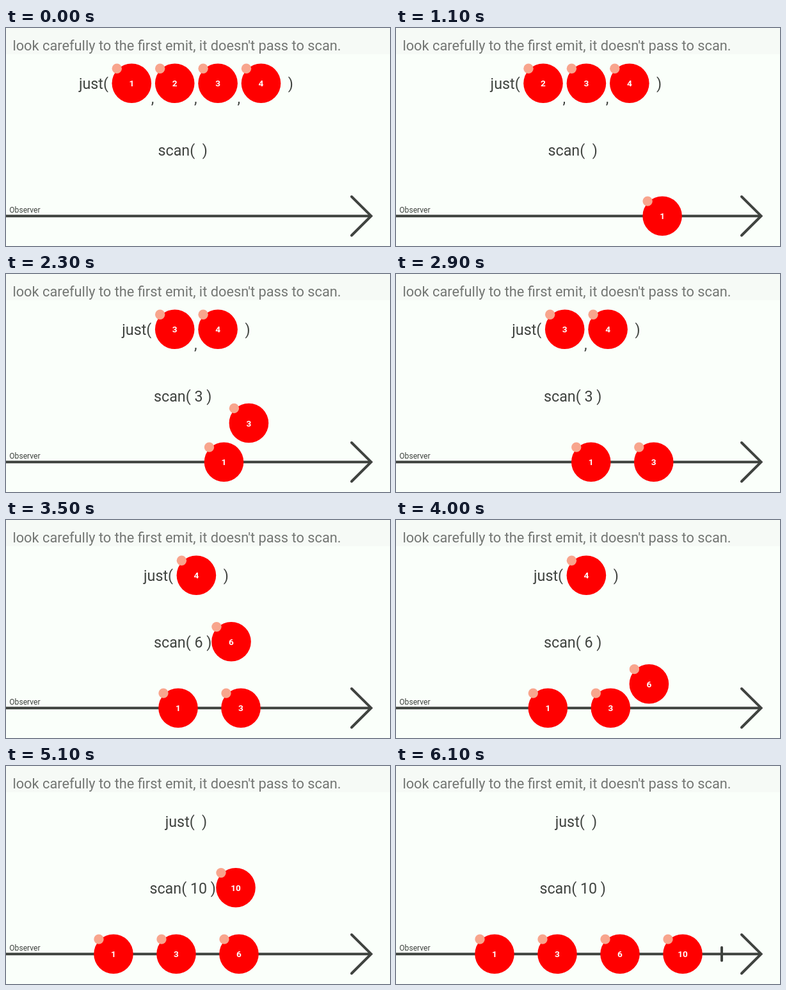
These frames come from a looping animation (600x340 px, 6.3 s). An HTML page:

```html
<!DOCTYPE html>
<html lang="en">
<head>
<meta charset="utf-8">
<title>scan</title>
<style>
  html, body { margin: 0; width: 100%; height: 100%; overflow: hidden; background: #fafffa; }
  svg { display: block; width: 100vw; height: 100vh; font-family: Roboto, sans-serif; }
  .ink { fill: none; stroke: #3f433f; stroke-width: 4; }
  .code { font-size: 23.3px; fill: #3f433f; }
  .label { font-size: 13.6px; font-weight: 700; fill: #fff; text-anchor: middle; }
</style>
</head>
<body>
<svg viewBox="0 0 600 340">
  <rect width="600" height="340" fill="#fafffa"/>
  <rect width="600" height="40.5" fill="#f6faf6"/>
  <text x="10.4" y="34.7" font-size="21.8" fill="#737673">look carefully to the first emit, it doesn't pass to scan.</text>
  <text x="5.3" y="287.5" font-size="12.1" fill="#3f433f">Observer</text>
  <path class="ink" d="M0 293.2H571"/>
  <path class="ink" stroke-linecap="round" d="M540 263L570.5 293.2L540 323.5"/>
  <path class="ink" id="end" stroke-linecap="round" d="M509 283V303.5"/>
  <text class="code" id="open" y="95">just(</text>
  <text class="code" id="close" y="95">)</text>
  <text class="code" id="scan" x="276.2" y="198.5" text-anchor="middle"></text>
  <g id="commas"></g>
  <g id="balls"></g>
</svg>
<script>
const NS = "http://www.w3.org/2000/svg";
const LOOP = 6300, STEP = 100;
const JUST_Y = 86.3, SCAN_Y = 189.7, LINE_Y = 293.2;
const SLOT = 67.4, GAP = 98;
const EMIT = [400, 1380, 2950, 4520];    // leaves just()
const REDUCE = [0, 1850, 3420, 4990];    // reaches scan()
const DROP = [400, 2060, 3630, 5200];    // heads for the line
const LAND = [1070, 2640, 4210, 5780];
const SUMS = [1, 3, 6, 10];
const DONE = 5880;
// x of the first ball on the line over time
const ROW = [[1070, 418], [2300, 340.5], [3500, 269], [4400, 212], [5100, 168], [5322, 154]];

const $ = id => document.getElementById(id);
const mix = (a, b, p) => a + (b - a) * p;
const part = (t, a, b) => Math.min(1, Math.max(0, (t - a) / (b - a)));

function add(parent, tag, attrs, text) {
  const el = document.createElementNS(NS, tag);
  for (const k in attrs) el.setAttribute(k, attrs[k]);
  if (text) el.textContent = text;
  return parent.appendChild(el);
}

const balls = SUMS.map(() => {
  const g = add($("balls"), "g", {});
  add(g, "circle", { r: 30.8, fill: "#f00" });
  add(g, "circle", { cx: -23, cy: -23.1, r: 7.7, fill: "#f8a58d" });
  return { g, label: add(g, "text", { class: "label", y: 5 }) };
});
const commas = [0, 1, 2].map(() => add($("commas"), "text", { class: "code", y: 117.5 }, ","));

const show = (el, on) => el.setAttribute("visibility", on ? "visible" : "hidden");

function rowX(t) {
  let x = ROW[0][1];
  for (let i = 1; i < ROW.length; i++) {
    const [t0] = ROW[i - 1], [t1, x1] = ROW[i];
    x = mix(x, x1, part(t, t0, t1));
  }
  return x;
}

const slotX = (i, left) => 331.1 - SLOT / 2 * left + SLOT * (i - 4 + left);

function place(i, t, left) {
  if (t < EMIT[i]) return [slotX(i, left), JUST_Y, i + 1];
  const land = rowX(LAND[i]) + GAP * i;
  if (t >= LAND[i]) return [rowX(t) + GAP * i, LINE_Y, SUMS[i]];
  if (i && t < REDUCE[i]) {
    const p = part(t, EMIT[i], REDUCE[i]);
    return [mix(slotX(i, 4 - i), 300, p), mix(JUST_Y, SCAN_Y, p), i + 1];
  }
  const x = i ? (SUMS[i] > 9 ? 359 : 352) : slotX(0, 4);
  const p = part(t, DROP[i], LAND[i]);
  return [mix(x, land, p), mix(i ? SCAN_Y : JUST_Y, LINE_Y, p), SUMS[i]];
}

function draw(t) {
  const left = EMIT.filter(e => t < e).length;
  $("open").setAttribute("x", 248.7 - SLOT / 2 * left);
  $("close").setAttribute("x", 306 + SLOT / 2 * left);
  balls.forEach(({ g, label }, i) => {
    const [x, y, n] = place(i, t, left);
    g.setAttribute("transform", `translate(${x} ${y})`);
    label.textContent = n;
  });
  commas.forEach((c, i) => {
    c.setAttribute("x", slotX(i, left) + 30.4);
    show(c, i >= 4 - left);
  });
  let sum = "";
  for (let i = 1; i < 4; i++) if (t >= REDUCE[i]) sum = SUMS[i];
  $("scan").textContent = `scan(\u00a0${sum}\u00a0)`;
  show($("end"), t >= DONE);
}

const start = performance.now();
function tick() {
  const t = (performance.now() - start) % LOOP;
  draw(Math.min(Math.floor(t / STEP) * STEP, LOOP - 2 * STEP));
  requestAnimationFrame(tick);
}
tick();
</script>
</body>
</html>
```
